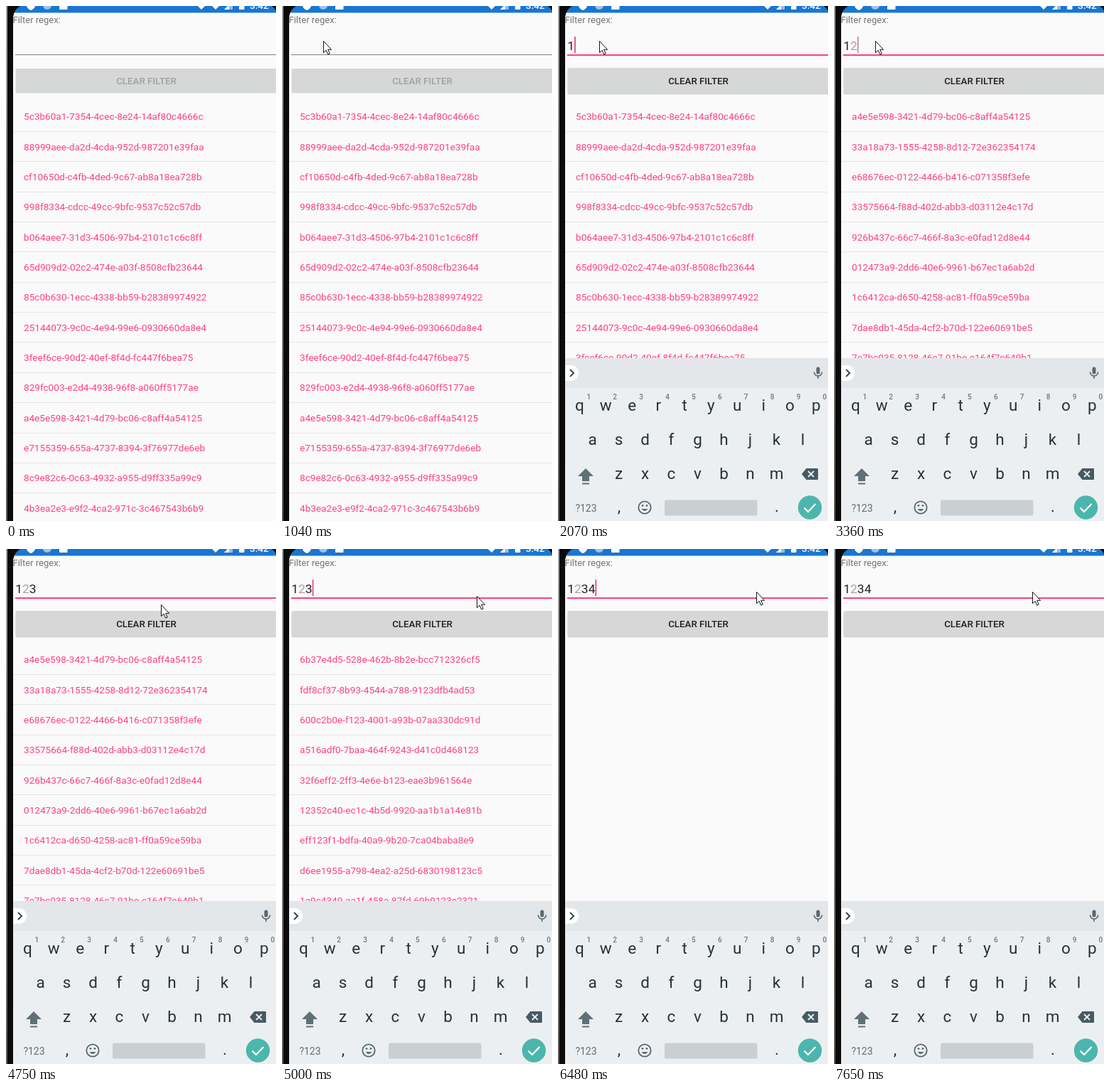
An HTML page for the animation above (8 s loop, 380 px wide and 724 px high).

```html
<!DOCTYPE html>
<html lang="en">
<head>
<meta charset="utf-8">
<title>Regex filter</title>
<style>
html, body { margin: 0; width: 100%; height: 100%; overflow: hidden; background: #fafafa; }
svg { display: block; width: 380px; height: 724px; font-family: Roboto, "Noto Sans", sans-serif; }
.row { font-size: 13.6px; fill: #ff4081; }
.key { font-size: 22.5px; fill: #263238; text-anchor: middle; }
.sup { font-size: 10px; fill: #6b7980; text-anchor: middle; font-weight: 500; }
</style>
</head>
<body>
<svg viewBox="0 0 380 724" xmlns="http://www.w3.org/2000/svg">
  <defs>
    <linearGradient id="edge" x1="0" y1="0" x2="0" y2="1">
      <stop offset="0" stop-color="#a2a2a3"/>
      <stop offset=".45" stop-color="#858586"/>
      <stop offset="1" stop-color="#5a5a5b"/>
    </linearGradient>
  </defs>
  <rect width="380" height="724" fill="#fafafa"/>

  <g id="status">
    <rect x="10" width="370" height="9.5" fill="#1976d2"/>
    <g fill="#fff">
      <path d="M29 0h12q-1 4-6 6q-5-2-6-6z"/>
      <circle cx="58" cy="-1" r="6" fill="#9cc4ec"/>
      <rect x="75" y="-6" width="11.5" height="11" rx="1"/>
      <path id="pin" d="M270 0h10l-5 5z"/>
      <path d="M290 0h10l-5 5z"/>
      <path d="M307 5l5-5h7v5z" fill="#8fbce8"/>
      <path d="M307 5l5-5h2v5z"/>
      <rect x="328" y="-6" width="7.5" height="11" rx="1"/>
      <text x="343" y="4" font-size="13.6" font-weight="500">3:42</text>
    </g>
  </g>

  <text x="9.5" y="24" font-size="13" fill="#757575">Filter regex:</text>
  <text id="input" x="13.3" y="62" font-size="17.4" fill="#212121"><tspan></tspan><tspan fill="#b59aa3"></tspan><tspan></tspan></text>
  <rect id="line" x="13" width="367"/>
  <rect id="caret" y="43" width="2" height="23"/>

  <rect id="shade" x="13.5" y="89" width="372" height="35.3" rx="2" fill="#c4c5c5" opacity=".75"/>
  <rect id="button" x="13.5" width="372" rx="2" fill="#d6d7d7"/>
  <text id="label" x="197.5" y="110.2" font-size="13.3" font-weight="500" text-anchor="middle">CLEAR FILTER</text>

  <g id="list"></g>

  <g id="board">
    <rect x="10" y="495" width="370" height="229" fill="#eceff1"/>
    <rect x="10" y="495" width="370" height="42" fill="#e3e7ea"/>
    <path d="M10 505h8a11 11 0 0 1 0 22h-8z" fill="#fff"/>
    <path d="M17 511l5 5l-5 5" fill="none" stroke="#37474f" stroke-width="2"/>
    <g fill="none" stroke="#5a6870" stroke-width="1.6">
      <rect x="363.5" y="507.5" width="5" height="10" rx="2.5" fill="#5a6870" stroke="none"/>
      <path d="M360.4 514.5a5.6 5.6 0 0 0 11.2 0M366 520v4"/>
    </g>
    <g id="keys"></g>
    <path d="M39 650l11 11h-6v7h-10v-7h-6zM34 670.5h10v2h-10z" fill="#607078"/>
    <path d="M343 658l6.5-8h15.5q1 0 1 1v14q0 1-1 1h-15.5z" fill="#455a64"/>
    <path d="M352 654l8 8m0-8l-8 8" stroke="#eceff1" stroke-width="1.8"/>
    <text x="39.5" y="710.5" font-size="14" fill="#607078" text-anchor="middle">?123</text>
    <text x="86" y="711" class="key">,</text>
    <g fill="none" stroke="#546870" stroke-width="1.8">
      <circle cx="122" cy="705" r="8.7"/>
      <path d="M117.5 707q4.5 6 9 0z" fill="#546870" stroke="none"/>
    </g>
    <circle cx="119" cy="702.3" r="1.4" fill="#546870"/>
    <circle cx="125" cy="702.3" r="1.4" fill="#546870"/>
    <rect x="150" y="694.5" width="130.5" height="22" rx="2.5" fill="#cacfd2"/>
    <text x="308" y="711" class="key">.</text>
    <circle cx="354.5" cy="705" r="16.7" fill="#4db6ac"/>
    <path d="M346.5 705.5l5.5 5.5l10.5-11" fill="none" stroke="#fff" stroke-width="2.2"/>
  </g>

  <rect width="10" height="724" fill="#0c0b0b"/>
  <rect width="2" height="724" fill="url(#edge)"/>
  <path d="M9.5 0H20Q12 4 10 15H9.5z" fill="#0c0b0b"/>
  <path d="M374 0h6v8q-1-5-6-8z" fill="#0c0b0b"/>

  <circle id="click" cx="58" cy="49" r="12" fill="#ff0" opacity=".47"/>
  <path id="mouse" d="M.5 .5V16.5L4.2 13.2L6.7 19L9.2 18L6.7 12.3H11.6z" fill="#fff" stroke="#111" stroke-width="1"/>
</svg>
<script>
const LOOP = 8000, PITCH = 42.35;
const $ = id => document.getElementById(id);
const NS = "http://www.w3.org/2000/svg";

const all = `5c3b60a1-7354-4cec-8e24-14af80c4666c 88999aee-da2d-4cda-952d-987201e39faa
cf10650d-c4fb-4ded-9c67-ab8a18ea728b 998f8334-cdcc-49cc-9bfc-9537c52c57db
b064aee7-31d3-4506-97b4-2101c1c6c8ff 65d909d2-02c2-474e-a03f-8508cfb23644
85c0b630-1ecc-4338-bb59-b28389974922 25144073-9c0c-4e94-99e6-0930660da8e4
3feef6ce-90d2-40ef-8f4d-fc447f6bea75 829fc003-e2d4-4938-96f8-a060ff5177ae
a4e5e598-3421-4d79-bc06-c8aff4a54125 e7155359-655a-4737-8394-3f76977de6eb
8c9e82c6-0c63-4932-a955-d9ff335a99c9 4b3ea2e3-e9f2-4ca2-971c-3c467543b6b9`.split(/\s+/);
const with12 = `a4e5e598-3421-4d79-bc06-c8aff4a54125 33a18a73-1555-4258-8d12-72e362354174
e68676ec-0122-4466-b416-c071358f3efe 33575664-f88d-402d-abb3-d03112e4c17d
926b437c-66c7-466f-8a3c-e0fad12d8e44 012473a9-2dd6-40e6-9961-b67ec1a6ab2d
1c6412ca-d650-4258-ac81-ff0a59ce59ba 7dae8db1-45da-4cf2-b70d-122e60691be5
7e7bc035-8128-46c7-91be-c164f7c649b1`.split(/\s+/);
const with123 = `6b37e4d5-528e-462b-8b2e-bcc712326cf5 fdf8cf37-8b93-4544-a788-9123dfb4ad53
600c2b0e-f123-4001-a93b-07aa330dc91d a516adf0-7baa-464f-9243-d41c0d468123
32f6eff2-2ff3-4e6e-b123-eae3b961564e 12352c40-ec1c-4b5d-9920-aa1b1a14e81b
eff123f1-bdfa-40a9-9b20-7ca04baba8e9 d6ee1955-a798-4ea2-a25d-6830198123c5
1a9c4349-aa1f-458a-87fd-69b9123c2321`.split(/\s+/);

// [start time, value]
const lists = [[0, all], [3140, all.filter(s => s.includes("1"))], [3345, with12], [4900, with123], [6480, []]];
const typed = [[0, ""], [2070, "1"], [3140, "12"], [3950, "123"], [6170, "1234"]];
const blink = [[0, 0], [1460, 1], [1890, 0], [2070, 1], [2500, 0], [2990, 1], [3700, 0], [3950, 1],
  [4440, 0], [4940, 1], [5460, 0], [5940, 1], [6700, 0], [7190, 1], [7650, 0]];
// [time, x, y]
const path = [[280, 314, 692], [350, 225, 430], [420, 120, 165], [520, 58, 30], [740, 58, 30], [1040, 58, 49],
  [4600, 58, 49], [4660, 108, 60], [4750, 218, 78], [4860, 258, 75], [5000, 274, 66], [5180, 279, 60]];

function add(parent, tag, attrs, text) {
  const el = document.createElementNS(NS, tag);
  for (const k in attrs) el.setAttribute(k, attrs[k]);
  if (text) el.textContent = text;
  parent.appendChild(el);
  return el;
}
function set(id, attrs) {
  for (const k in attrs) $(id).setAttribute(k, attrs[k]);
}
const show = (id, on) => { $(id).style.display = on ? "" : "none"; };
const at = (table, t) => table.filter(s => s[0] <= t).pop()[1];

function pointAt(t) {
  const i = path.findIndex(p => p[0] > t);
  if (i < 0) return path[path.length - 1].slice(1);
  const a = path[i - 1], b = path[i], k = (t - a[0]) / (b[0] - a[0]);
  return [1, 2].map(n => Math.round(a[n] + (b[n] - a[n]) * k));
}

[["qwertyuiop", 30.3, 569], ["asdfghjkl", 48.5, 616.5], ["zxcvbnm", 85.5, 665]].forEach(([chars, x, y], row) => {
  [...chars].forEach((c, i) => {
    add($("keys"), "text", { class: "key", x: x + i * 37, y }, c);
    if (!row) add($("keys"), "text", { class: "sup", x: 43.3 + i * 36.9, y: 553 }, String((i + 1) % 10));
  });
});

// Baselines sit on whole pixels
const rows = all.map((_, i) => {
  const g = add($("list"), "g", {});
  add(g, "rect", { x: 10, y: Math.round(176 + i * PITCH), width: 370, height: 1, fill: "#e6e6e6" });
  return { g, text: add(g, "text", { class: "row", x: 25, y: Math.round(160.25 + i * PITCH) }) };
});
const parts = $("input").children;
let shown = null;

function render(t) {
  const ids = at(lists, t), word = at(typed, t), n = word.length;
  if (ids !== shown) {
    rows.forEach((r, i) => {
      r.g.style.display = ids[i] ? "" : "none";
      r.text.textContent = ids[i] || "";
    });
    shown = ids;
  }
  [word.slice(0, 1), word.slice(1, 2), word.slice(2)].forEach((s, i) => { parts[i].textContent = s; });

  const focus = t >= 1460, ready = n > 0;
  set("line", { y: 68, height: focus ? 2 : 1, fill: focus ? "#ff4081" : "#808080" });
  set("caret", { x: 13.2 + n * 9.77, fill: n === 2 ? "#c893a6" : "#f0588c" });
  show("caret", at(blink, t));
  show("shade", ready);
  set("button", { y: ready ? 87 : 88, height: ready ? 36 : 34.5 });
  set("label", { fill: ready ? "#212121" : "#9fa2a3" });
  show("pin", t < 400);

  const k = Math.min(1, Math.max(0, (t - 1650) / 240));
  show("board", k > 0);
  set("board", { transform: `translate(0 ${229 * (1 - k) ** 2})` });

  show("click", t >= 1130 && t < 1280);
  show("mouse", t >= 280);
  if (t >= 280) set("mouse", { transform: `translate(${pointAt(t).join(" ")})` });
}

const start = performance.now();
function tick() {
  render((performance.now() - start) % LOOP);
  requestAnimationFrame(tick);
}
tick();
</script>
</body>
</html>
```
